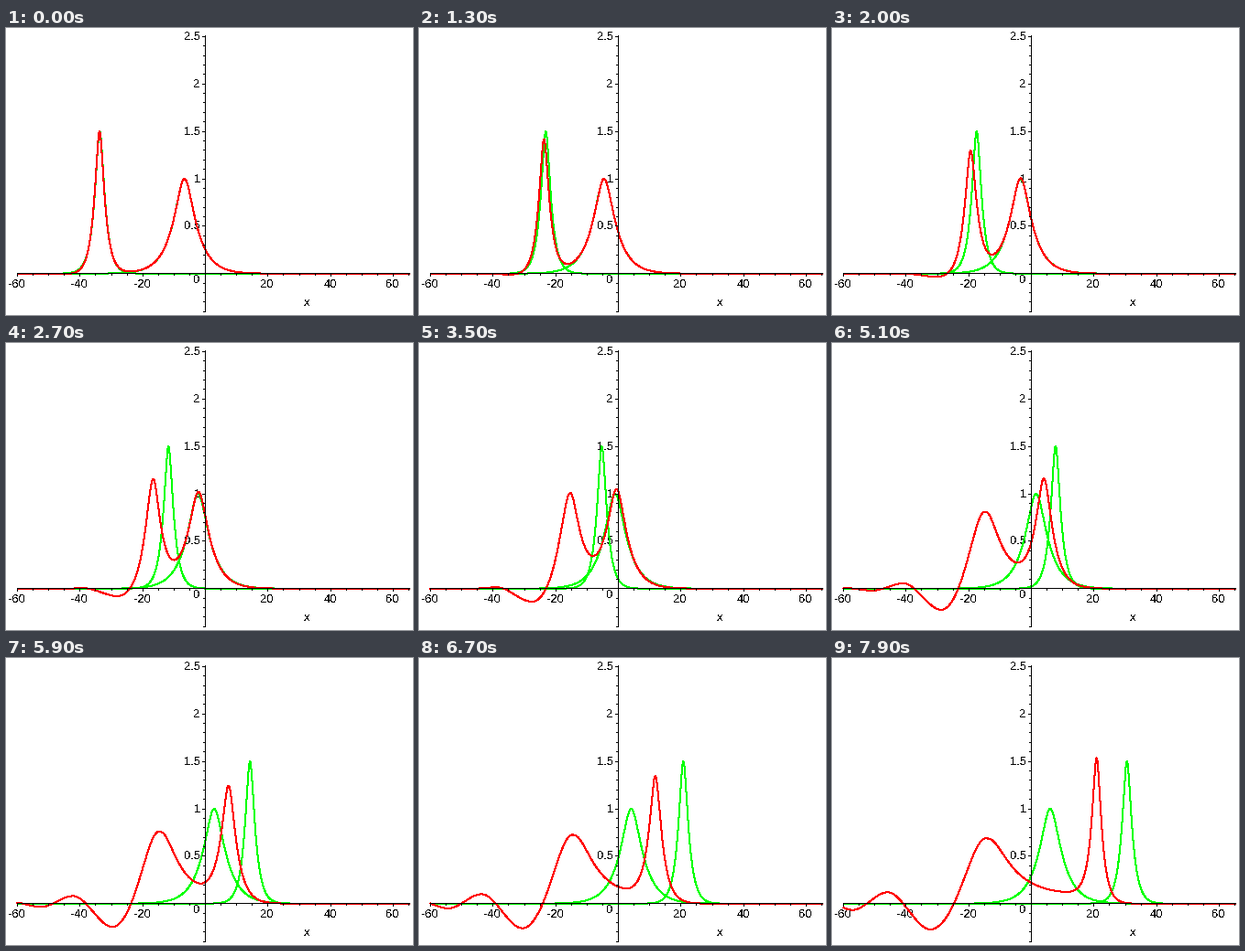
Write a matplotlib script that moves like this. It is 444x314 px and loops after 8 s.

```python
import numpy as np
import matplotlib.pyplot as plt
from matplotlib.animation import FuncAnimation
from matplotlib.patches import Rectangle

plt.rcParams["font.family"] = "Liberation Sans"
plt.rcParams["text.antialiased"] = False

W, H, DPI = 444, 314, 100
FRAMES, INTERVAL = 80, 100
PX = 72 / DPI                    # one pixel in points
T0, DT = -100.0, 2.41            # simulated time
X0, Y0 = 217.5, 268.8            # pixel position of the origin
SX, SY = 205 / 60, 103.8         # pixels per unit
x = np.linspace(-60, 65, 1251)

# ripples left of the rear hump: final height, onset, steepness
RIPPLES = [(-0.29, 36, 3.4), (0.145, 56, 4.6), (-0.085, 63, 5.5), (0.05, 70, 6.4)]


def px(v):
    return X0 + v * SX


def py(v):
    return Y0 - v * SY


def bell(z):
    return 1 / np.sqrt(np.cosh(z))


def free_path(amp, i):
    """Centre of an undisturbed wave; its speed is amp^4 / 15."""
    return amp**4 / 15 * (T0 + DT * i)


def soliton(amp, centre):
    """Solitary wave of u_t + u^4 u_x + u_xxx = 0."""
    return amp * bell(2 * amp**2 / np.sqrt(15) * (x - centre))


def decay(i, half, power):
    """Falls from 1 to 0, passing 1/2 at i = half."""
    return 1 / (1 + (i / half) ** power)


def ripples(i, crest):
    """Wave train left of x = crest, eased from one extreme to the next."""
    gap = 9.3 + 0.055 * i
    heights = [a * (1 - decay(i, half, p)) for a, half, p in RIPPLES]
    y = np.full_like(x, heights[0])
    for right, left in zip(heights, heights[1:]):
        s = np.clip((crest - x) / gap, 0, 1)
        y = np.where(x < crest, right + (left - right) * s * s * (3 - 2 * s), y)
        crest -= gap
        gap *= 0.82
    return y, heights[0]


def interacting(i):
    # the front wave grows and speeds up
    w = max(0, (i - 10) / 69)
    front_x = free_path(1, i) + 14.8 * w**3.42
    front = soliton(1 + 0.515 * w**2.35, front_x)

    # the rear wave runs into a slow line and gets stuck there
    line = -16.1 + 0.03 * i
    rear_x = line - 4 * np.log1p(np.exp((line - free_path(1.5, i)) / 4))
    top = 0.6 + 0.9 * decay(i, 31.2, 2.45)

    # left flank, flat where it meets the first trough
    width = np.hypot(10, 0.1975 * i)
    y, low = ripples(i, rear_x - width)
    k = width * (0.12 + 1.04 * decay(i, 28.3, 3.7))
    v = (rear_x - x) / width
    floor = 2 * bell(k)
    rise = (bell(k * v) + bell(k * (2 - v)) - floor) / (1 + bell(2 * k) - floor)
    y = np.where(v <= 1, low + (top - low) * rise, y)

    # right flank and shelf, ending at the front wave
    r = x - rear_x
    right = top * bell((0.2 + 0.96 * decay(i, 30.5, 3)) * r)
    right += 0.1 * w**2.5 * r**2 / (r**2 + 200)
    right /= 1 + np.exp((x - front_x + 1.5) / 1.2)
    return np.where(r >= 0, right, y) + front


fig = plt.figure(figsize=(W / DPI, H / DPI), dpi=DPI, facecolor="white")
ax = fig.add_axes([0, 0, 1, 1])
ax.set(xlim=(0, W), ylim=(H, 0))
ax.axis("off")


def bar(left, top, w, h):
    ax.add_patch(Rectangle((left, top), w, h, fc="black", lw=0, zorder=5))


def label(xp, base, text, ha="center"):
    ax.text(xp, base, text, fontsize=13 * PX, ha=ha, va="baseline", zorder=1)


def curve(color, z):
    # without antialiasing a one pixel pen marks two pixels
    return ax.plot([], [], color=color, lw=PX, zorder=z,
                   antialiased=False, snap=False)[0]


bar(12, 268, 429, 1)
bar(217, 8, 1, 303)
for n in range(-60, 66, 5):
    p = int(px(n))
    major = n % 20 == 0
    bar(p, 269, 1, 3 if major else 2)
    if major and n:
        label(p - 0.5, 284, str(n))
for n in range(-4, 26):
    p = int(py(n / 10))
    major = n % 5 == 0
    size = 3 if major else 2
    bar(217 - size, p, size, 1)
    if major and n:
        label(212, p + 4, f"{n / 10:g}", "right")
label(211.5, 279, "0", "right")
label(328, 304, "x")

tall = curve("#00ff00", 2)
wide = curve("#00ff00", 2)
red = curve("#ff0000", 3)


def update(i):
    for line, amp in ((tall, 1.5), (wide, 1.0)):
        line.set_data(px(x), py(soliton(amp, free_path(amp, i))))
    red.set_data(px(x), py(interacting(i)))
    return tall, wide, red


anim = FuncAnimation(fig, update, frames=FRAMES, interval=INTERVAL,
                     repeat=True, repeat_delay=0)
plt.show()
```
